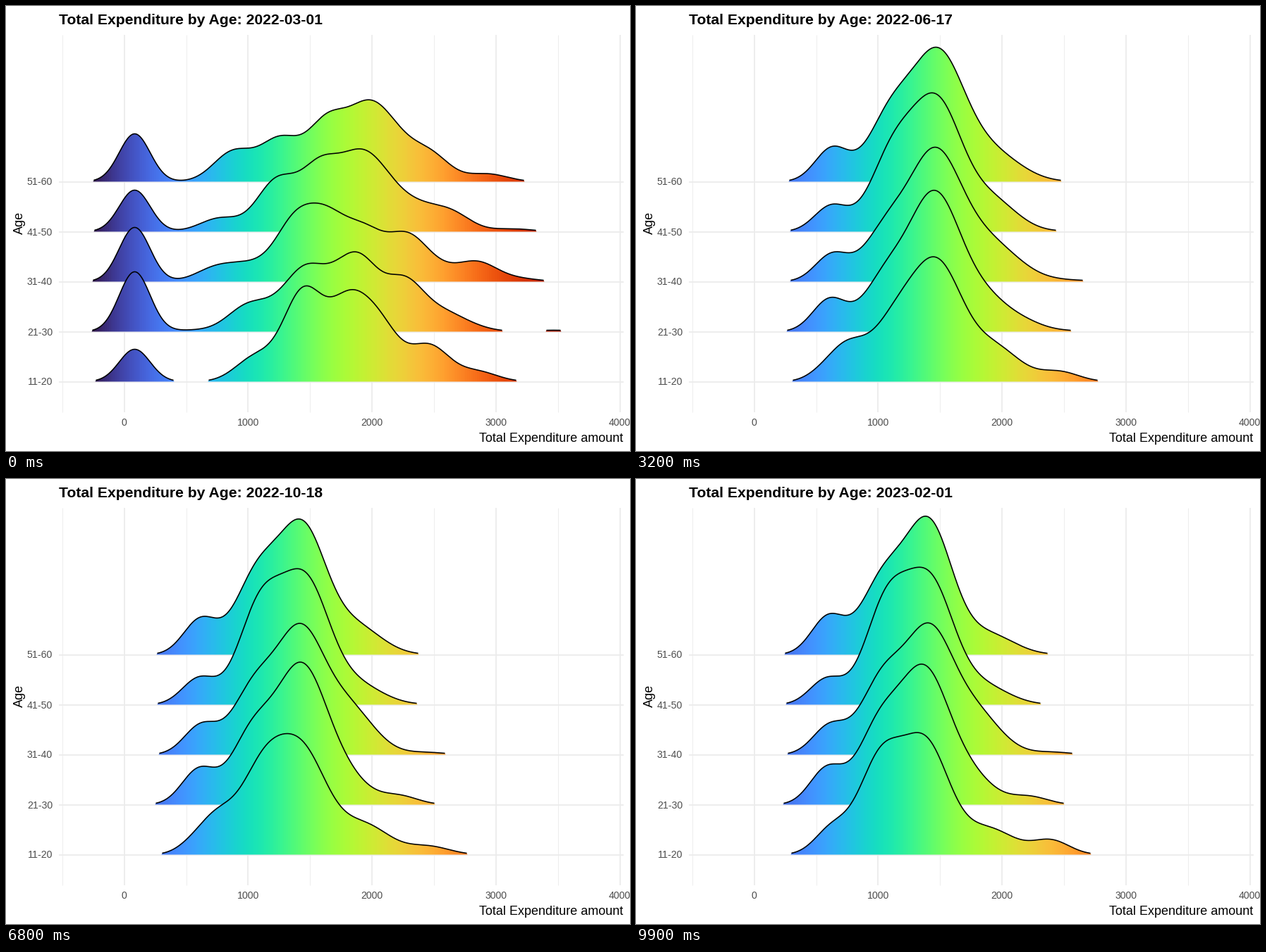
A matplotlib script that plays this animation: 885x632 px, repeating every 10000 ms.

```python
import matplotlib.pyplot as plt
import numpy as np
from matplotlib.animation import FuncAnimation
from matplotlib.path import Path

W, H, DPI = 885, 632, 64
PT = 72 / DPI                      # points per pixel
FRAMES, DAYS = 100, 337
START = np.datetime64("2022-03-01")
AGES = ["51-60", "41-50", "31-40", "21-30", "11-20"]
BASES = [249 + 71 * k for k in range(5)]
CUT = 1.95                         # parts of a ridge lower than this are hidden
X = np.arange(100, 800)

plt.rcParams["font.family"] = "Liberation Sans"


def ridge(widths, bumps):
    """Sum of bell curves, each given by its centre and height in pixels."""
    return sum(h * np.exp(-((X - c) / w)**2 / 2)
               for (c, h), w in zip(bumps, widths))


def month(widths, *ridges):
    return np.array([ridge(widths, bumps) for bumps in ridges])


# Main groups of spenders: low, middle, typical, high, very high.
SPRING = (24, 35, 37, 36, 26)
LATER = (24, 31, 33, 36, 26, 20)

march = month(
    [22] + [28] * 10,
    [(182, 68), (322, 42), (388, 58), (455, 82), (510, 84), (548, 50),
     (600, 38), (682, 11)],
    [(182, 59), (303, 19), (383, 70), (445, 87), (498, 81), (535, 52),
     (582, 28), (630, 26), (718, 4)],
    [(182, 77), (297, 19), (345, 20), (408, 78), (455, 78), (508, 64),
     (568, 60), (612, 14), (668, 27), (728, 4)],
    [(182, 85), (265, 2), (340, 32), (378, 18), (422, 75), (465, 40),
     (502, 88), (565, 69), (620, 22), (658, 6), (776, 2.1)],
    [(182, 46), (353, 34), (421, 125), (484, 101), (530, 72), (600, 50),
     (668, 14)])
april = month(
    SPRING,
    [(278, 46), (372, 83), (440, 180), (525, 35)],
    [(278, 34), (365, 68), (425, 178), (505, 60)],
    [(278, 34), (362, 62), (433, 190), (525, 50), (640, 2.2)],
    [(274, 42), (362, 53), (425, 176), (505, 60), (612, 2.5)],
    [(278, 22), (330, 53), (427, 191), (507, 48), (595, 20)])
september = month(
    LATER,
    [(277, 48), (358, 113), (423, 172), (495, 44)],
    [(275, 38), (363, 137), (428, 172), (500, 28), (635, 2.1)],
    [(277, 41), (353, 86), (418, 166), (487, 68), (600, 3)],
    [(274, 48), (352, 96), (421, 184), (473, 48), (558, 12)],
    [(299, 57), (371, 124), (428, 130), (510, 45), (612, 9), (258, 9)])
february = month(
    LATER,
    [(272, 53), (349, 101), (415, 183), (500, 28)],
    [(270, 36), (355, 140), (417, 166), (492, 26)],
    [(274, 40), (349, 103), (415, 165), (480, 58), (590, 3.5)],
    [(270, 50), (345, 108), (408, 173), (466, 45), (558, 11)],
    [(277, 35), (346, 131), (411, 152), (500, 36), (588, 20)])

STATES = [march, april, september, february]
KNOTS = [0, 9, 53, 99]

fig = plt.figure(figsize=(W / DPI, H / DPI), dpi=DPI, facecolor="white")
ax = fig.add_axes([0, 0, 1, 1])


def label(x, y, s, size, **kw):
    return ax.text(x, y, s, fontsize=size * PT, va="baseline", **kw)


def rule(x, y, width):
    ax.plot(x, y, color="#EBEBEB", lw=width * PT, zorder=1,
            solid_capstyle="butt")


for i in range(5):
    x = 167.2 + 175.7 * i
    rule([x - 87.8] * 2, [40, 576], 0.85)
    rule([x, x], [40, 576], 1.7)
    label(x, 595, str(1000 * i), 14.1, ha="center", color="#4D4D4D")
for age, base in zip(AGES, BASES):
    rule([74, 875], [base, base], 1.7)
    label(65.5, base + 5, age, 14.1, ha="right", color="#4D4D4D")

title = label(74.5, 26, "", 21.1, weight="bold")
label(875, 618.5, "Total Expenditure amount", 17.95, ha="right")
label(23.5, 307.5, "Age", 17.95, ha="center", rotation=90,
      rotation_mode="anchor")

# The fill colour depends only on the amount spent.
amount = (X - 167.2) / 0.1757
colors = plt.get_cmap("turbo")((amount + 300) / 4070)[None]
fills, lines = [], []
for k, base in enumerate(BASES):
    fills.append(ax.imshow(colors, extent=(99.5, 799.5, base + 0.5, base - 205.5),
                           aspect="auto", interpolation="nearest",
                           zorder=2 + k))
    lines += ax.plot([], [], color="black", lw=1.6 * PT, zorder=2.5 + k,
                     solid_capstyle="butt", solid_joinstyle="round")

ax.set_xlim(-0.5, W - 0.5)
ax.set_ylim(H - 0.5, -0.5)
ax.axis("off")


def update(i):
    title.set_text(f"Total Expenditure by Age: {START + i * DAYS // (FRAMES - 1)}")
    pos = np.interp(i, KNOTS, range(len(STATES)))
    a = min(int(pos), len(STATES) - 2)
    heights = STATES[a] + (pos - a) * (STATES[a + 1] - STATES[a])
    for base, h, fill, line in zip(BASES, heights, fills, lines):
        shown = h >= CUT
        top = base - np.where(shown, h, 0)
        outline = np.column_stack([np.r_[X, X[-1], X[0]],
                                   np.r_[top, base, base]])
        fill.set_clip_path(Path(outline), ax.transData)
        line.set_data(X, np.where(shown, top, np.nan))
    return [title, *fills, *lines]


anim = FuncAnimation(fig, update, frames=FRAMES, interval=100, repeat=True,
                     blit=False)
plt.show()
```
